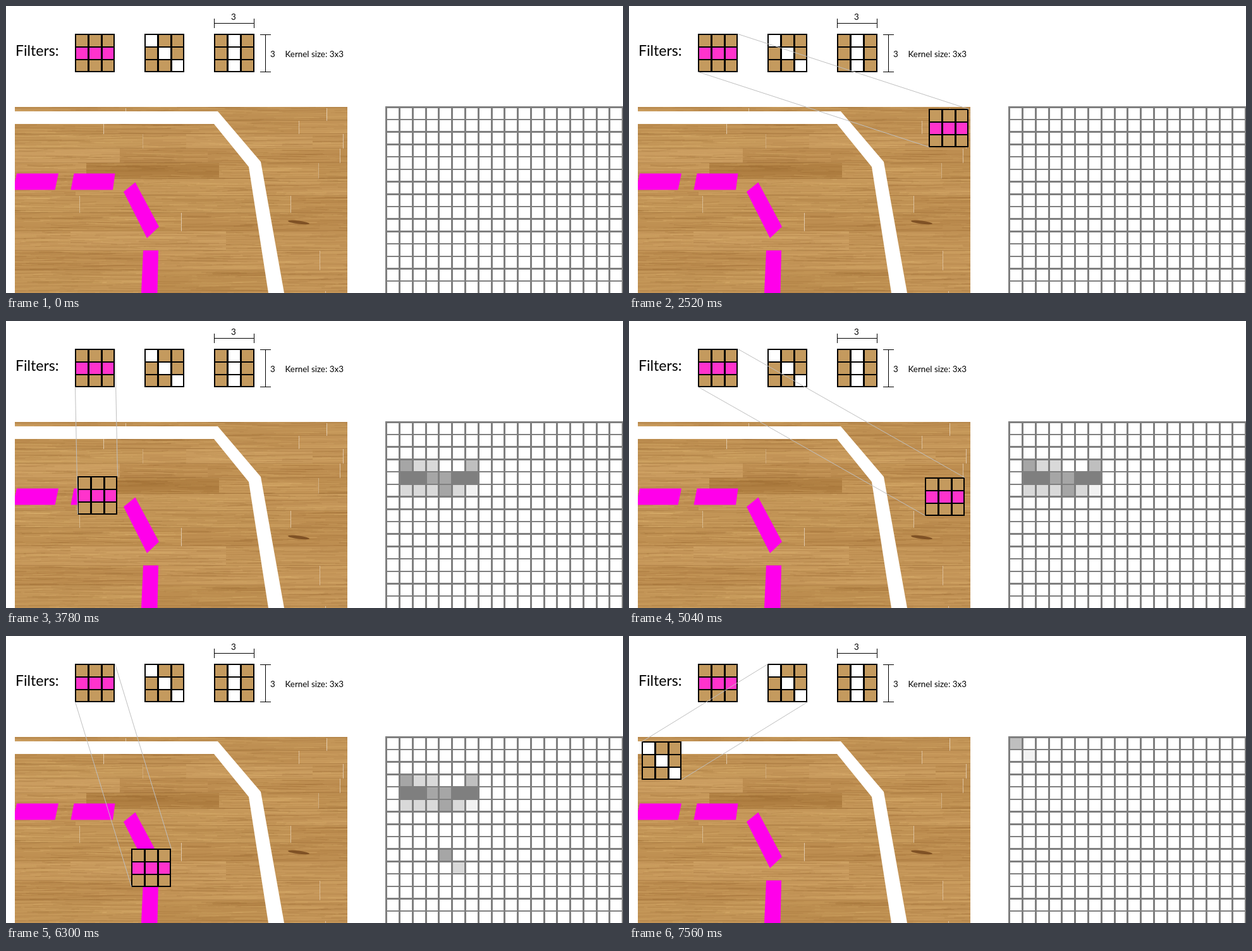
An HTML page with a canvas for the animation above (8 s loop, 976x455 px).

```html
<!DOCTYPE html>
<html lang="en">
<head>
<meta charset="utf-8">
<title>Convolution filters</title>
<style>
  html, body { margin: 0; width: 100%; height: 100%; overflow: hidden; background: #fff; }
  canvas, svg { position: absolute; left: 0; top: 0; }
  text { font-family: Lato, Carlito, "Open Sans", sans-serif; font-size: 13.4px; fill: #000; }
  .title { font-size: 23.1px; }
  .mid { text-anchor: middle; }
  .crisp { shape-rendering: crispEdges; }
  .dim { fill: none; stroke: #000; }
  .link { stroke: #bfbfbf; }
</style>
</head>
<body>
<canvas id="wood" width="976" height="455"></canvas>
<svg width="976" height="455" viewBox="0 0 976 455">
  <path fill="#fff" d="M14 167H335L403 247L440 455H415L384 255L329 187H14Z"/>
  <path fill="#ff00ea" d="M17 265.500H83L77.500 291.500H14V279ZM107.500 265.500H172.500L169 291.500H102.500ZM204.500 279.500L242 350L223 368L186 294.500ZM217 387.500H241L239.500 455H214Z"/>
  <text class="title" x="15" y="79">Filters:</text>
  <text class="mid" x="360" y="22">3</text>
  <text class="mid" x="422" y="80.500">3</text>
  <text x="441.500" y="80.500">Kernel size: 3x3</text>
  <path class="dim crisp" d="M329.500 20V35M392.500 20V35M329 27.500H393M402 45.500H419M402 104.500H419M410.500 45V105"/>
  <g id="filters" class="crisp"></g>
  <g id="cells" class="crisp"></g>
  <g id="grid" class="crisp"></g>
  <g id="mover">
    <g id="kernels" class="crisp"></g>
    <line class="link"/>
    <line class="link"/>
  </g>
</svg>
<script>
const LOOP = 8000, STEP = 630;
const $ = id => document.getElementById(id);

function add(parent, tag, attrs) {
  const el = document.createElementNS('http://www.w3.org/2000/svg', tag);
  for (const k in attrs) el.setAttribute(k, attrs[k]);
  return parent.appendChild(el);
}
const rect = (parent, x, y, width, height, fill) =>
  add(parent, 'rect', { x, y, width, height, fill });

// Wooden floor: seeded planks in rows that get taller, plus a few distinct ones
function drawFloor() {
  const c = $('wood').getContext('2d');
  let seed = 11;
  const rnd = () => (seed = seed * 16807 % 2147483647) / 2147483647;
  const rowTop = i => Math.round(182 + 20.5 * i + 0.65 * i * i);

  function plank(row, x, right, tone) {
    const y = rowTop(row), w = right - x, h = rowTop(row + 1) - y;
    c.save();
    c.beginPath();
    c.rect(x, y, w, h);
    c.clip();
    c.fillStyle = `rgb(${172 + 4 * tone},${123 + 4.4 * tone},${61 + 4.5 * tone})`;
    c.fillRect(x, y, w, h);
    for (let n = w * h / 110; n > 0; n--) {
      const gx = x + rnd() * w - 40, gy = y + rnd() * h, len = 40 + rnd() * 110;
      c.strokeStyle = rnd() < 0.5 ? 'rgba(120,70,20,.1)' : 'rgba(240,205,140,.11)';
      c.lineWidth = 0.5 + rnd() * 1.5;
      c.beginPath();
      c.moveTo(gx, gy);
      c.quadraticCurveTo(gx + len / 2, gy + rnd() * 6 - 3, gx + len, gy + rnd() * 4 - 2);
      c.stroke();
    }
    c.fillStyle = 'rgba(110,65,20,.2)';
    c.fillRect(x, y + h - 1, w, 1);
    c.restore();
  }

  c.beginPath();
  c.rect(14, 160, 526, 295);
  c.clip();
  for (let row = -2; row <= 10; row++)
    for (let x = 14 - rnd() * 150, end; x < 540; x = end) {
      end = x + 180 + rnd() * 170;
      plank(row, x, end, 4 + rnd() * 2.5 - Math.max(0, row - 4) * 0.1);
    }
  plank(1, 285, 485, 7);
  plank(2, 14, 180, 7.5);
  plank(3, 127, 337, 1);
  plank(4, 110, 392, 6.5);
  plank(7, 102, 348, 7);

  c.fillStyle = 'rgba(95,50,15,.65)';
  c.beginPath();
  c.ellipse(463, 343, 17, 2.5, 0.12, 0, 7);
  c.fill();
}

// 3x3 kernel on black, its lines snapped to whole pixels
const COLORS = { t: '#c49a5e', m: '#ff33cc', w: '#ffffff' };
function kernel(parent, pattern, x = 0, y = 0) {
  const g = add(parent, 'g');
  const lineX = i => Math.floor(x + 20.6 * i), lineY = i => y + Math.floor(19.9 * i + 0.3);
  rect(g, lineX(0), y, lineX(3) - lineX(0) + 2, 61, '#000');
  [...pattern].forEach((p, i) => {
    const col = i % 3, row = i / 3 | 0;
    const left = lineX(col) + (col ? 3 : 2), top = lineY(row) + 2;
    rect(g, left, top, lineX(col + 1) - left, lineY(row + 1) - top, COLORS[p]);
  });
  return g;
}

const PATTERNS = ['tttmmmttt', 'wtttwtttw', 'twttwttwt'];
const filterX = i => 109 + 110.15 * i, FILTER_Y = 44;
PATTERNS.forEach((p, i) => kernel($('filters'), p, filterX(i), FILTER_Y));
const kernels = PATTERNS.slice(0, 2).map(p => kernel($('kernels'), p));
const links = document.querySelectorAll('.link');

// Feature map
const GRAY = '#7f7f7f', COLS = 18, ROWS = 15;
const colX = i => Math.floor(600.95 + 20.76 * i);
const rowY = (i, shift = 0) => Math.round(159 + 19.71 * i + shift);
for (let i = 0; i <= COLS; i++) rect($('grid'), colX(i), 159, 3, 296, GRAY);
for (let i = 0; i <= ROWS; i++) rect($('grid'), 601, rowY(i), 375, rowY(i, 2.55) - rowY(i), GRAY);

const cells = [];
function cell(col, row, shade, from, to) {
  const el = rect($('cells'), colX(col), rowY(row), colX(col + 1) - colX(col), rowY(row + 1) - rowY(row), shade);
  cells.push({ el, from, to });
}
// Digits pick a shade, a space leaves the cell empty
const SHADES = [GRAY, '#a6a6a6', '#bfbfbf', '#d9d9d9', '#f2f2f2'];
['133  2', '001100', '333134'].forEach((line, r) =>
  [...line].forEach((s, i) => {
    if (s !== ' ') cell(i + 1, r + 3, SHADES[s], i < 3 ? 5 : 6, 11);
  }));
cell(4, 9, SHADES[1], 10, 11);
cell(5, 10, SHADES[3], 10, 11);
cell(0, 0, SHADES[2], 12, 12);
cell(1, 1, SHADES[4], 12, 12);

// Key points of the scan: three passes, then the next filter starts
const SCAN = [
  [17, 163], [172, 162], [317, 165], [474, 163],
  [20, 248], [113, 246], [300, 247], [468, 248],
  [18, 337], [198, 337], [371, 337],
  [20, 167]
];

function link(el, fx, x, y, dx, dy) {
  const ends = { x1: fx + dx, y1: FILTER_Y + dy, x2: x + dx, y2: y + dy };
  for (const k in ends) el.setAttribute(k, ends[k]);
}

function show(step) {
  $('mover').style.display = step ? '' : 'none';
  for (const c of cells) c.el.style.display = step >= c.from && step <= c.to ? '' : 'none';
  if (!step) return;
  const [x, y] = SCAN[step - 1], f = step < SCAN.length ? 0 : 1;
  const fx = filterX(f), toLeft = x < fx;
  kernels.forEach((k, i) => {
    k.style.display = i === f ? '' : 'none';
    k.setAttribute('transform', `translate(${x} ${y})`);
  });
  link(links[0], fx, x, y, toLeft ? 0.5 : 63.5, 0.5);
  link(links[1], fx, x, y, toLeft ? 63.5 : 0.5, 60.5);
}

let last = -1;
function tick() {
  const step = Math.floor(performance.now() % LOOP / STEP);
  if (step !== last) show(last = step);
  requestAnimationFrame(tick);
}
drawFloor();
tick();
</script>
</body>
</html>
```
